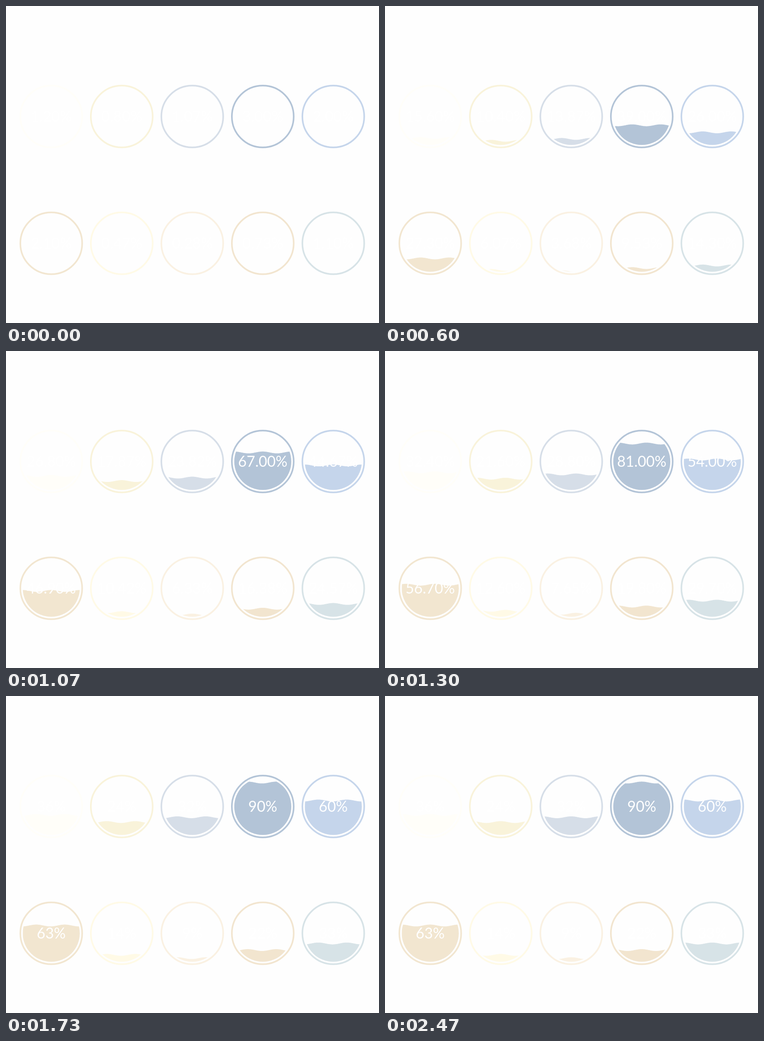
These frames come from a looping animation (812 px wide and 690 px high, 2500 ms). An HTML page with a canvas:

```html
<!DOCTYPE html>
<html lang="en">
<head>
<meta charset="utf-8">
<title>Liquid gauges</title>
<style>
  html, body { margin: 0; width: 100%; height: 100%; overflow: hidden; background: #fefefe; }
  canvas { display: block; }
</style>
</head>
<body>
<canvas id="stage" width="812" height="690"></canvas>
<script>
const ctx = document.getElementById('stage').getContext('2d');
const LOOP = 2500, STEP = 100 / 3;
const RING = 67.3, RING_WIDTH = 3.45, FILL = 62.1;
const WAVE_HEIGHT = 2, WAVE_LENGTH = 62;

// Final percentage and colour, in reading order.
const gauges = [
  [36, '#fffef9'], [24, '#f9f3da'], [32, '#d6dee8'], [90, '#b3c4d7'], [60, '#c5d5eb'],
  [63, '#f2e6d0'], [14, '#fffae6'], [8.5, '#faf1e2'], [22, '#f2e5cf'], [33, '#d7e3e7']
];

const clamp = x => Math.max(0, Math.min(1, x));

function circle(radius) {
  ctx.beginPath();
  ctx.arc(0, 0, radius, 0, Math.PI * 2);
}

function drawLiquid(percent, t) {
  const filled = clamp((t - 47) / 1410) * percent / 100;
  const level = 65.2 - 130.4 * filled;
  const crest = 14.6 + 0.0443 * t;
  ctx.save();
  circle(FILL);
  ctx.clip();
  ctx.beginPath();
  ctx.moveTo(-FILL, 70);
  for (let x = -FILL; x <= FILL + 1; x++) {
    ctx.lineTo(x, level - WAVE_HEIGHT * Math.cos((x - crest) / WAVE_LENGTH * Math.PI * 2));
  }
  ctx.lineTo(FILL + 1, 70);
  ctx.fill();
  ctx.restore();
}

function label(percent, t) {
  const tick = Math.min(90, Math.round(81 + (t - 1300) * 0.06));
  if (tick === 90) return Math.round(percent) + '%';
  return (percent * Math.max(0, tick) / 90).toFixed(2) + '%';
}

function drawGauge([percent, color], i, t) {
  ctx.save();
  ctx.translate(98.5 + 153.5 * (i % 5), i < 5 ? 240.5 : 516.5);
  ctx.strokeStyle = ctx.fillStyle = color;
  ctx.lineWidth = RING_WIDTH;
  circle(RING);
  ctx.stroke();
  if (t > 0) drawLiquid(percent, t);
  ctx.fillStyle = '#fff';
  ctx.fillText(label(percent, t), 0, 11.5);
  ctx.restore();
}

function render(now) {
  // The picture advances at 30 steps per second.
  const t = Math.floor((now % LOOP + 4) / STEP) % 75 * STEP;
  ctx.fillStyle = '#fefefe';
  ctx.fillRect(0, 0, 812, 690);
  ctx.font = '32px Lato, sans-serif';
  ctx.textAlign = 'center';
  gauges.forEach((gauge, i) => drawGauge(gauge, i, t));
}

function loop() {
  render(performance.now());
  requestAnimationFrame(loop);
}
loop();
</script>
</body>
</html>
```
